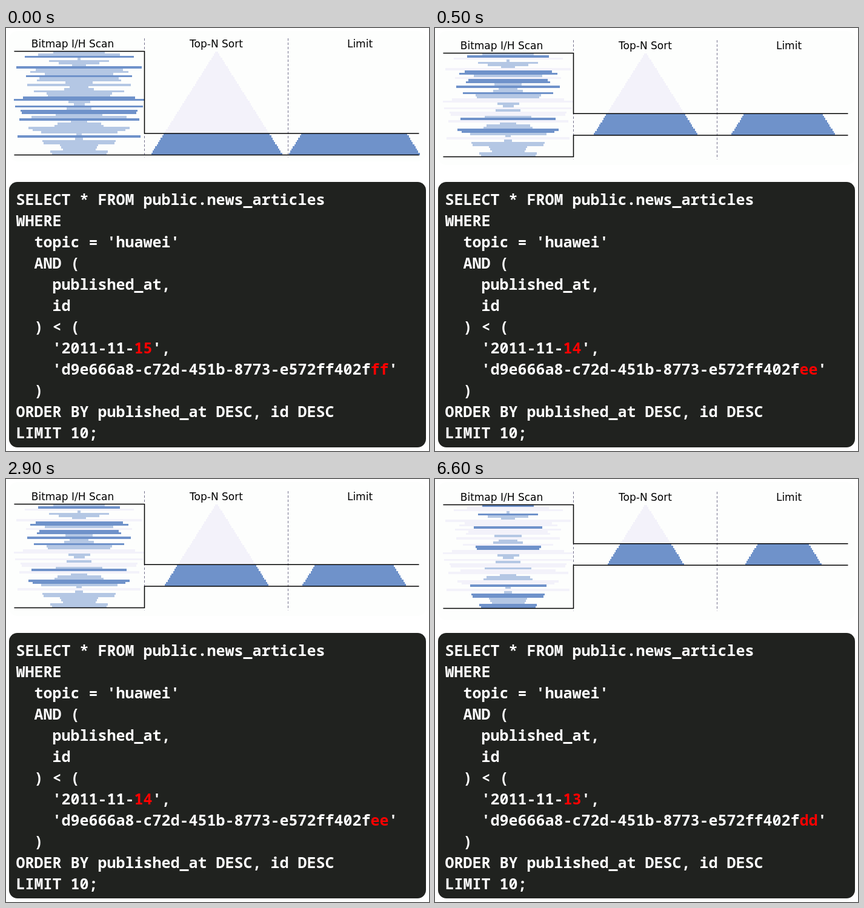
An HTML page with a canvas for the animation above (8 s loop, 698 by 698 pixels).

```html
<!DOCTYPE html>
<html lang="en">
<head>
<meta charset="utf-8">
<title>Keyset pagination</title>
<style>
  html, body { margin: 0; width: 100%; height: 100%; overflow: hidden; background: #fff; }
  canvas { display: block; width: 698px; height: 698px; }
</style>
</head>
<body>
<canvas id="stage" width="698" height="698"></canvas>
<script>
const ctx = document.getElementById('stage').getContext('2d');

const LOOP = 8000;
const PAGE = 10;
const ROW_H = 171 / 48;
const ROW_STEP = 4.5;
const DARK = '#6f92ca', LIGHT = '#b4c7e4', FAINT = '#f3f2fa';

// Rank of each table row in scan order; a higher rank is a wider bar.
const ranks = [
  18, 29, 39, 0, 21, 14, 4, 45, 31, 35, 24, 38, 28, 30, 9, 37,
  6, 10, 32, 23, 22, 40, 47, 7, 3, 46, 8, 42, 41, 16, 34, 43,
  5, 15, 17, 36, 33, 27, 1, 44, 2, 26, 25, 13, 12, 11, 20, 19
];

const pages = [
  { start: 0, top: 38.5, cardEnd: 220, end: 48, day: '15', tail: 'ff' },
  { start: 500, top: 41.5, cardEnd: 226, end: 38, day: '14', tail: 'ee' },
  { start: 4500, top: 42.5, cardEnd: 233, end: 28, day: '13', tail: 'dd' }
];

function card(top, bottom, color) {
  ctx.fillStyle = color;
  ctx.beginPath();
  ctx.roundRect(5, top, 688, bottom - top, 14);
  ctx.fill();
}

function bar(cx, top, row, rank, color) {
  const half = (rank + 1) * ROW_STEP / 2;
  const x = Math.round(cx - half), y = Math.round(top + row * ROW_H);
  ctx.fillStyle = color;
  ctx.fillRect(x, y, Math.round(cx + half) - x, Math.round(top + (row + 1) * ROW_H) - y);
}

function path(...points) {
  ctx.beginPath();
  points.forEach(([x, y]) => ctx.lineTo(x, y));
  ctx.stroke();
}

function drawChart({ top, end, cardEnd }) {
  const first = end - PAGE;
  const bottom = top + 48 * ROW_H;
  const upper = top + first * ROW_H, lower = top + end * ROW_H;

  card(5, cardEnd, '#fdfefd');

  ranks.forEach((rank, row) => {
    const color = rank >= end ? FAINT : rank >= first ? DARK : LIGHT;
    bar(120.5, top, row, rank, color);
  });
  for (let r = 0; r < end; r++) {
    bar(347.5, top, r, r, r < first ? FAINT : DARK);
    if (r >= first) bar(574.5, top, r, r, DARK);
  }

  ctx.lineWidth = 1;
  ctx.strokeStyle = '#77758f';
  ctx.setLineDash([4, 3]);
  for (const x of [228.5, 465.5]) path([x, top - 21.5], [x, bottom + 4]);
  ctx.setLineDash([]);

  ctx.lineWidth = 1.5;
  ctx.strokeStyle = '#000';
  path([13.5, top], [228.5, top], [228.5, upper], [681.5, upper]);
  path([13.5, bottom], [228.5, bottom], [228.5, lower], [681.5, lower]);

  ctx.fillStyle = '#000';
  ctx.font = '17px "DejaVu Sans", sans-serif';
  ctx.textAlign = 'center';
  ctx.fillText('Bitmap I/H Scan', 110, top - 6.5);
  ctx.fillText('Top-N Sort', 347, top - 6.5);
  ctx.fillText('Limit', 584, top - 6.5);
}

function drawCode({ day, tail }) {
  // Text between bars is highlighted.
  const lines = [
    'SELECT * FROM public.news_articles',
    'WHERE',
    "  topic = 'huawei'",
    '  AND (',
    '    published_at,',
    '    id',
    '  ) < (',
    `    '2011-11-|${day}|',`,
    `    'd9e666a8-c72d-451b-8773-e572ff402f|${tail}|'`,
    '  )',
    'ORDER BY published_at DESC, id DESC',
    'LIMIT 10;'
  ];
  card(254, 692, '#20221f');
  ctx.font = 'bold 25px "Noto Sans Mono", monospace';
  ctx.textAlign = 'left';
  lines.forEach((line, i) => {
    let x = 16.5;
    line.split('|').forEach((part, j) => {
      ctx.fillStyle = j % 2 ? '#f00' : '#fff';
      ctx.fillText(part, x, 292 + i * 35);
      x += ctx.measureText(part).width;
    });
  });
}

const origin = performance.now();

function draw() {
  const t = (performance.now() - origin) % LOOP;
  const page = pages.filter(p => p.start <= t).pop();
  ctx.clearRect(0, 0, 698, 698);
  drawChart(page);
  drawCode(page);
  requestAnimationFrame(draw);
}
draw();
</script>
</body>
</html>
```
